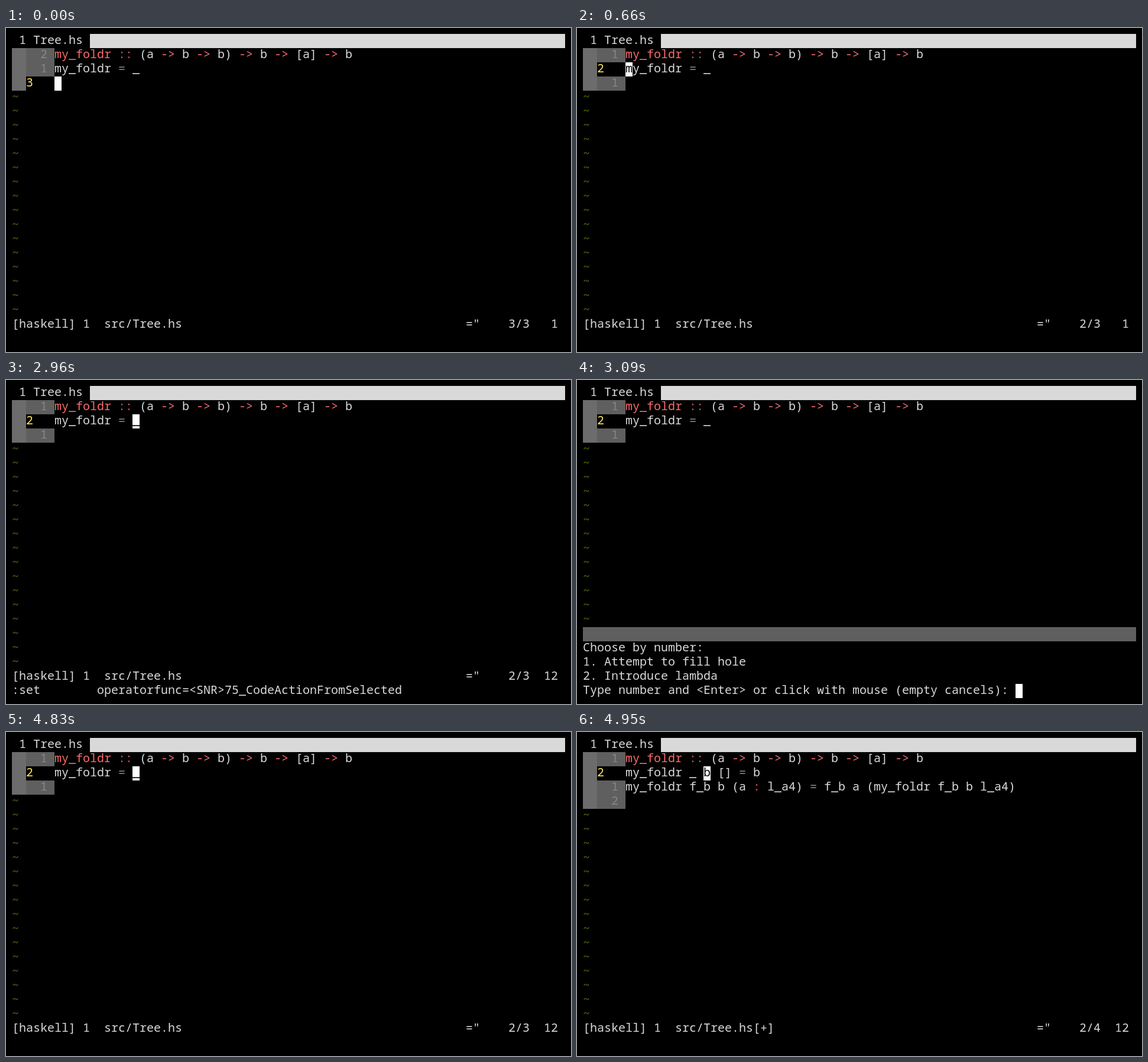
An HTML page with a canvas for the animation above (8 s loop, 956x548 px).

```html
<!DOCTYPE html>
<html lang="en">
<head>
<meta charset="utf-8">
<title>Editor session</title>
<style>
html, body { margin: 0; width: 100%; height: 100%; overflow: hidden; background: #000; }
canvas { display: block; }
</style>
</head>
<body>
<canvas id="screen" width="956" height="548"></canvas>
<script>
const ctx = document.getElementById('screen').getContext('2d');
const LOOP = 8000, PAD = 10, CELL_W = 12, CELL_H = 24, BASELINE = 17, COLS = 78;
const CODE_COL = 6, STATUS_ROW = 20, LAST_ROW = 21;
const FONT = '20px "Noto Sans Mono", monospace';
const C = {
  text: '#d9d9d9', red: '#fb6b6b', darkRed: '#d75f5f', dim: '#878787',
  sign: '#6c6c6c', gutter: '#5f5f5f', number: '#878787', current: '#ffe462',
  tilde: '#4e6a10', cursor: '#fff'
};

const signature = 'my_foldr :: (a -> b -> b) -> b -> [a] -> b';
const hole = [signature, 'my_foldr = _', ''];
const filled = [
  signature,
  'my_foldr _ b [] = b',
  'my_foldr f_b b (a : l_a4) = f_b a (my_foldr f_b b l_a4)',
  ''
];
const question = 'Type number and <Enter> or click with mouse (empty cancels): ';

// Each scene holds until the next one starts.
const scenes = [
  { at: 0, lines: hole, row: 3, col: 1 },
  { at: 660, lines: hole, row: 2, col: 1 },
  { at: 1310, lines: hole, row: 2, col: 12 },
  { at: 2960, lines: hole, row: 2, col: 12,
    command: ':set        operatorfunc=<SNR>75_CodeActionFromSelected' },
  { at: 3090, lines: hole, row: 2, answer: '' },
  { at: 4120, lines: hole, row: 2, answer: '1' },
  { at: 4830, lines: hole, row: 2, col: 12 },
  { at: 4950, lines: filled, row: 2, col: 12, changed: true }
];

function block(col, row, width, color) {
  ctx.fillStyle = color;
  ctx.fillRect(PAD + col * CELL_W, PAD + row * CELL_H, width * CELL_W, CELL_H);
}

function write(col, row, text, color = C.text, weight = 400) {
  ctx.font = weight + ' ' + FONT;
  ctx.fillStyle = color;
  ctx.fillText(text, PAD + col * CELL_W, PAD + row * CELL_H + BASELINE);
}

function tokenColor(token, isSignature, start) {
  if (isSignature && start === 0) return C.red;
  if (token === '->') return C.red;
  if (token[0] === ':') return C.darkRed;
  if (token === '=') return C.dim;
  return C.text;
}

function writeCode(line, row) {
  for (const match of line.matchAll(/->|:+|=|\w+|[^\s\w]/g)) {
    const color = tokenColor(match[0], line === signature, match.index);
    write(CODE_COL + match.index, row, match[0], color);
  }
}

function drawCursor(col, row, char = '') {
  block(col, row, 1, C.cursor);
  write(col, row, char, '#000');
}

function drawBuffer(scene) {
  scene.lines.forEach((line, i) => {
    const row = i + 1, distance = Math.abs(row - scene.row);
    block(0, row, 2, C.sign);
    if (distance) {
      block(2, row, 4, C.gutter);
      write(4, row, String(distance), C.number);
    } else {
      write(2, row, String(row), C.current);
    }
    writeCode(line, row);
  });
  const end = scene.answer === undefined ? STATUS_ROW : 17;
  for (let row = scene.lines.length + 1; row < end; row++) write(0, row, '~', C.tilde);
}

function drawPrompt(answer) {
  block(0, 17, COLS, C.gutter);
  write(0, 18, 'Choose by number:');
  write(0, 19, '1. Attempt to fill hole');
  write(0, 20, '2. Introduce lambda');
  write(0, LAST_ROW, question + answer);
  drawCursor(question.length + answer.length, LAST_ROW);
}

function drawStatus(scene) {
  write(0, STATUS_ROW, '[haskell] 1  src/Tree.hs' + (scene.changed ? '[+]' : ''));
  write(64, STATUS_ROW, '="');
  write(70, STATUS_ROW, scene.row + '/' + scene.lines.length);
  write(75, STATUS_ROW, String(scene.col).padStart(2));
  write(0, LAST_ROW, scene.command || '');
  const char = scene.lines[scene.row - 1][scene.col - 1];
  drawCursor(CODE_COL + scene.col - 1, scene.row, char);
}

function draw(time) {
  const scene = scenes.findLast(s => s.at <= time);
  ctx.fillStyle = '#000';
  ctx.fillRect(0, 0, 956, 548);
  write(1, 0, '1 Tree.hs', C.text, 500);
  block(11, 0, 67, C.text);
  drawBuffer(scene);
  if (scene.answer === undefined) drawStatus(scene);
  else drawPrompt(scene.answer);
}

const start = performance.now();
function tick() {
  draw((performance.now() - start) % LOOP);
  requestAnimationFrame(tick);
}
tick();
</script>
</body>
</html>
```
